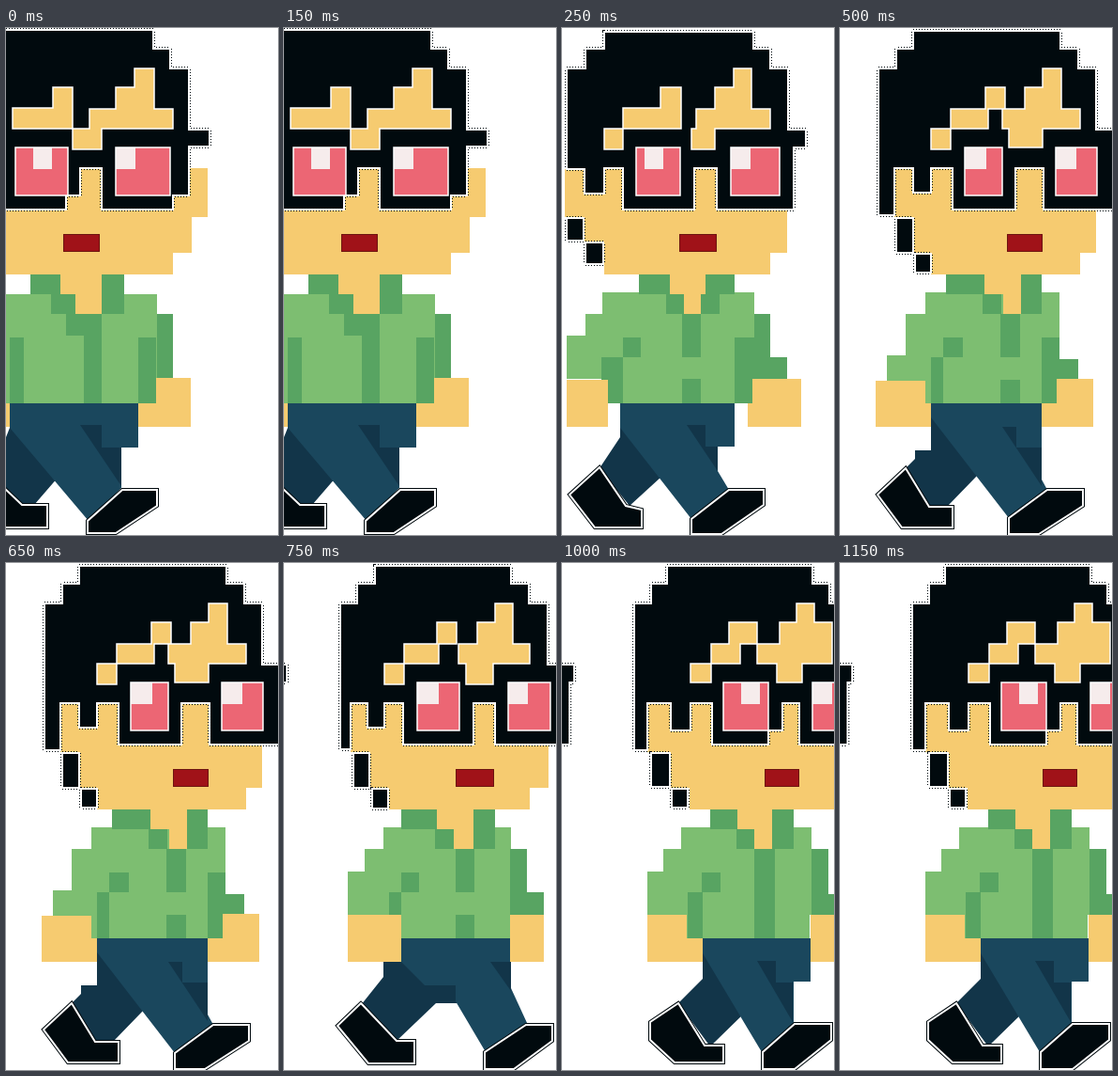
Write an HTML page with a canvas that moves like this. It is 290 by 539 pixels and loops after 1250 ms.

```html
<!DOCTYPE html>
<html lang="en">
<head>
<meta charset="utf-8">
<title>Pixel walk</title>
<style>
html, body { margin: 0; width: 100%; height: 100%; overflow: hidden; background: #fff; }
canvas { display: block; width: 290px; height: 539px; }
</style>
</head>
<body>
<canvas id="stage" width="290" height="539"></canvas>
<script>
const ctx = document.getElementById('stage').getContext('2d');
const STEP = 250;
const INK = '#010a0e', SKIN = '#f6cb70', WHITE = '#fff';
const SHIRT = '#7dbe71', SHADE = '#58a462';
const CLOTH = '#1a475d', CLOTH_DARK = '#123549';

const box = (x0, y0, x1, y1) => `M${x0} ${y0}H${x1}V${y1}H${x0}Z`;

// lens: [left, right, glare left, glare right]
const poses = [
  {
    skin: 'M-3 149H215V201H198V239H178V262H102V304H74V283H58V262H-3Z',
    hair: 'M-3 2H157V22H175V43H195V108H217V126H195V178H178V193H102V149H79V178H64V193H-3Z',
    brows: 'M7 85H50V63H71V107H7ZM137 43H158V86H178V107H102V129H71V107H89V86H117V63H137Z',
    lenses: [[10, 66, 29, 49], [117, 175, 117, 138]],
    mouth: [61, 100],
    shirt: 'M-3 283H161V304H178V372H160V399H-3Z',
    shade: 'M26 262H58V283H74V304H102V399H83V327H64V304H48V283H26Z' + box(102, 262, 126, 304) +
      box(141, 329, 160, 399) + 'M161 304H178V372H161Z' + box(4, 329, 19, 399),
    hands: 'M160 372H197V424H141V399H160Z' + box(-3, 375, 4, 424),
    backLeg: 'M4 399V425L0 435V489L15 507H30L56 477L60 420Z',
    frontLeg: 'M4 399H141V446H123V489L88 524L4 425Z',
    fold: 'M79 422H102V446H123V487Z',
    shoes: 'M-3 488L17 507H44V531H-3ZM87 537V524L124 491H161V508L117 537Z'
  },
  {
    skin: 'M3 150H24V176H45V149H165V193H240V239H222V262H153V283H148V304H130V283H115V262H45V227H24V201H3Z',
    hair: 'M45 4H204V22H222V43H241V108H260V127H247V193H165V149H141V193H65V149H45V176H24V150H5V43H25V22H45Z' +
      box(5, 202, 23, 226) + box(25, 228, 44, 251),
    brows: 'M65 85H105V63H127V107H65V129H45V107H65ZM183 43H202V86H222V107H163V129H138V107H143V86H163V63H183Z',
    lenses: [[79, 126, 88, 108], [180, 232, 180, 201]],
    mouth: [125, 165],
    shirt: 'M43 281H205V304H222V350H240V373H203V399H49V373H5V327H25V304H43Z',
    shade: 'M82 262H115V283H130V304H111V283H82ZM153 262H184V283H168V304H148V283H153Z' +
      box(128, 304, 148, 350) + box(128, 373, 148, 399) + box(65, 329, 84, 350) +
      'M42 350H65V399H49V374H42ZM205 304H222V350H240V373H203V399H184V329H205Z',
    hands: box(5, 374, 49, 424) + 'M203 373H255V424H198V399H203Z',
    backLeg: 'M62 399V435L40 468L72 508L106 477L110 430Z',
    frontLeg: 'M62 399H184V445H166V471L178 491L138 522L62 425Z',
    fold: 'M133 422H153V445H166V471Z',
    shoes: 'M40 467L8 496L35 531H85V512L68 508ZM138 538V522L178 491H215V507L170 538Z'
  },
  {
    skin: 'M58 149H217V193H273V239H256V262H193V304H174V283H154V262H97V239H79V201H58Z',
    hair: 'M78 3H235V22H254V43H273V108H293V193H217V149H187V193H120V149H97V175H78V149H58V199H41V43H60V22H78Z' +
      box(60, 202, 78, 239) + box(80, 240, 97, 260),
    brows: 'M118 86H155V63H176V86H158V107H118V129H97V107H118ZM216 43H236V86H256V107H216V127H180V107H173V86H197V63H216Z',
    lenses: [[133, 173, 133, 156], [230, 274, 230, 252]],
    mouth: [178, 216],
    shirt: 'M91 281H234V352H254V373H231V399H91V375H50V348H70V304H91Z',
    shade: 'M113 262H154V283H172V304H152V283H113Z' + box(193, 262, 215, 304) +
      box(171, 304, 192, 350) + box(171, 374, 192, 399) + box(110, 329, 131, 350) +
      box(97, 350, 110, 399) + 'M215 329H234V352H254V373H231V399H215Z',
    hands: 'M38 375H91V399H97V424H38ZM231 373H270V424H215V399H231Z',
    backLeg: 'M97 399V449H80V458L70 468L95 508H115L148 474L150 430Z',
    frontLeg: 'M97 399H215V480L221 491L180 521L97 414Z',
    fold: 'M173 424H188V446H215V487Z',
    shoes: 'M70 468L40 496L66 531H120V509H95ZM180 538V521L221 491H259V508L212 538Z'
  },
  {
    skin: 'M71 149H225V193H282V239H262V262H202V304H181V283H163V262H112V239H92V201H71Z',
    hair: 'M97 3H242V22H261V43H281V108H293V193H225V149H202V193H127V149H107V175H89V149H71V198H60V43H78V22H97Z' +
      box(74, 202, 91, 239) + box(94, 240, 111, 261) + box(-3, 108, 3, 127),
    brows: 'M128 86H163V63H184V86H165V107H128V129H107V107H128ZM225 43H244V86H262V107H223V129H194V107H186V86H206V63H225Z',
    lenses: [[142, 187, 142, 165], [239, 284, 239, 260]],
    mouth: [183, 224],
    shirt: 'M106 281H242V304H259V350H277V374H241V399H125V374H68V328H86V304H106Z',
    shade: 'M125 262H163V283H181V304H161V283H125Z' + box(202, 262, 225, 304) +
      box(183, 304, 203, 350) + box(183, 374, 203, 399) + box(125, 329, 144, 350) +
      box(112, 350, 125, 374) + 'M241 304H259V350H277V374H241Z',
    hands: box(68, 374, 125, 424) + box(241, 374, 277, 424),
    backLeg: 'M125 399V424H106V440L82 470L120 508L162 468H184V440Z',
    frontLeg: 'M125 399H242V452L260 491L215 520L183 466V449H150L125 424Z',
    fold: 'M220 424H242V455Z',
    shoes: 'M82 468L57 492L90 532H139V508H120ZM214 538V520L258 491H286V508L245 538Z'
  },
  {
    skin: 'M91 149H293V262H224V304H205V283H187V262H136V239H115V201H91Z',
    hair: 'M112 3H267V22H285V43H293V193H253V149H235V178H220V193H160V149H137V178H116V149H91V199H77V43H95V22H112Z' +
      box(95, 202, 115, 238) + box(117, 240, 134, 260) + 'M-3 108H13V127H8V193H-3Z',
    brows: 'M159 86H178V63H208V86H190V107H159V127H137V107H159ZM250 43H269V63H288V107H256V127H229V107H208V86H232V63H250Z',
    lenses: [[172, 220, 191, 211], [267, 293, 267, 288]],
    mouth: [216, 253],
    shirt: 'M127 281H266V304H284V352H293V374H264V399H133V374H91V328H108V304H127Z',
    shade: 'M158 262H187V283H205V304H186V283H158Z' + box(224, 262, 247, 304) +
      box(205, 304, 227, 399) + box(149, 329, 169, 350) + box(134, 350, 150, 399) +
      'M266 304H284V352H293V374H266Z',
    hands: 'M91 374H133V399H150V424H91Z' + box(265, 374, 293, 424),
    backLeg: 'M150 399V442L124 468L158 514L195 478L200 430Z',
    frontLeg: 'M150 399H265V445H247V491L213 520L150 415Z',
    fold: 'M208 423H228V446H246V488Z',
    shoes: 'M124 468L94 488V507L120 531H172V513H152ZM214 538V520L248 490H287V507L248 538Z'
  }
];

function fill(path, color) {
  ctx.fillStyle = color;
  ctx.fill(new Path2D(path));
}

function line(path, color, width, dash = []) {
  ctx.strokeStyle = color;
  ctx.lineWidth = width;
  ctx.setLineDash(dash);
  ctx.stroke(new Path2D(path));
}

// Black shape with a white rim and a fine outer line
function inked(path, dash) {
  line(path, INK, 4, dash);
  fill(path, INK);
  line(path, WHITE, 2);
}

function draw(p) {
  fill(box(0, 0, 290, 539), WHITE);
  fill(p.backLeg, CLOTH_DARK);
  fill(p.frontLeg, CLOTH);
  fill(p.fold, CLOTH_DARK);
  inked(p.shoes);
  fill(p.hands, SKIN);
  fill(p.shirt, SHIRT);
  fill(p.skin, SKIN);
  fill(p.shade, SHADE);
  inked(p.hair, [1, 2]);
  fill(p.brows, SKIN);
  line(p.brows, WHITE, 1.5);
  for (const [left, right, shineLeft, shineRight] of p.lenses) {
    const lens = box(left, 127, right, 178);
    fill(lens, '#ec6674');
    fill(box(shineLeft, 127, shineRight, 150), '#f6ecec');
    line(lens, WHITE, 1.5);
  }
  const [left, right] = p.mouth;
  fill(box(left, 219, right, 238), '#a01218');
  line(box(left + 0.5, 219.5, right - 0.5, 237.5), '#6d1510', 1);
}

function tick(now) {
  draw(poses[Math.floor(now / STEP) % poses.length]);
  requestAnimationFrame(tick);
}

draw(poses[0]);
requestAnimationFrame(tick);
</script>
</body>
</html>
```
